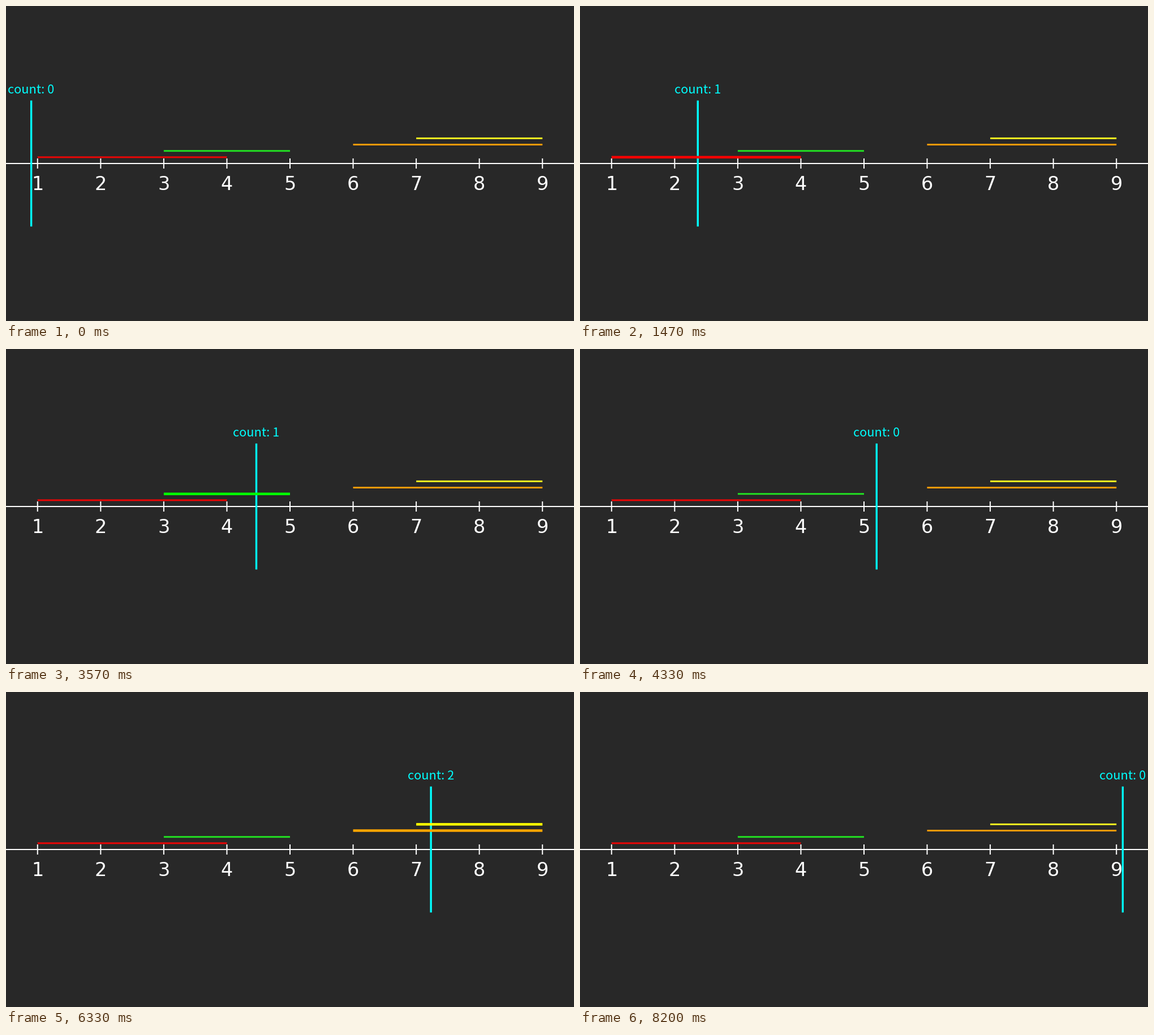
A matplotlib script for the animation above (8.23 s loop, 1004 by 558 pixels).

```python
import matplotlib.pyplot as plt
from matplotlib.animation import FuncAnimation

W, H, DPI = 1004, 558, 64
PT = 72 / DPI                 # points per pixel
UNIT = W / 9                  # the axis shows 0.5 to 9.5
MID = H / 2
FPS, FRAMES, LOOP_MS = 30, 247, 8230
CYAN = "#00ffff"

# start, end, resting colour, active colour
SEGMENTS = [
    (1, 4, "#ea0505", "#ff0000"),
    (3, 5, "#22e022", "#00ff00"),
    (6, 9, "#fb9a0a", "#ffa500"),
    (7, 9, "#f0ee20", "#ffff00"),
]


def px(value):
    return (value - 0.5) * UNIT


def line(x0, y0, x1, y1, color, width, z):
    return ax.plot([x0, x1], [y0, y1], color=color, lw=width * PT, zorder=z,
                   solid_capstyle="butt", snap=False)[0]


def label(x, y, text, size, color, font, z):
    return ax.text(x, y, text, fontsize=size * PT, color=color, family=font,
                   ha="center", va="baseline", zorder=z)


fig = plt.figure(figsize=(W / DPI, H / DPI), dpi=DPI, facecolor="#282828")
ax = fig.add_axes([0, 0, 1, 1])
ax.set_xlim(0, W)
ax.set_ylim(H, 0)
ax.axis("off")

line(0, MID, W, MID, "white", 2, 1)
for n in range(1, 10):
    line(px(n), MID - 9, px(n), MID + 9, "white", 2, 1)
    label(px(n), 326, str(n), 33.5, "white", "DejaVu Sans", 1)

bar = line(0, MID - UNIT, 0, MID + UNIT, CYAN, 3.4, 2)
counter = label(0, 155, "", 21.8, CYAN, "Noto Sans CJK JP", 4)
bars = [line(px(a), MID - UNIT * 0.1 * (i + 1), px(b),
             MID - UNIT * 0.1 * (i + 1), rest, 3, 3)
        for i, (a, b, rest, _) in enumerate(SEGMENTS)]


def update(frame):
    pos = round(0.9 + frame / FPS, 6)
    x = px(pos)
    bar.set_xdata([x, x])
    count = 0
    for art, (start, end, rest, active) in zip(bars, SEGMENTS):
        hit = start <= pos <= end
        count += hit
        art.set_color(active if hit else rest)
        art.set_linewidth((4.5 if hit else 3) * PT)
    counter.set_x(x)
    counter.set_text(f"count: {count}")
    return [bar, counter, *bars]


anim = FuncAnimation(fig, update, frames=FRAMES, interval=LOOP_MS / FRAMES,
                     repeat=True, repeat_delay=0)
plt.show()
```
